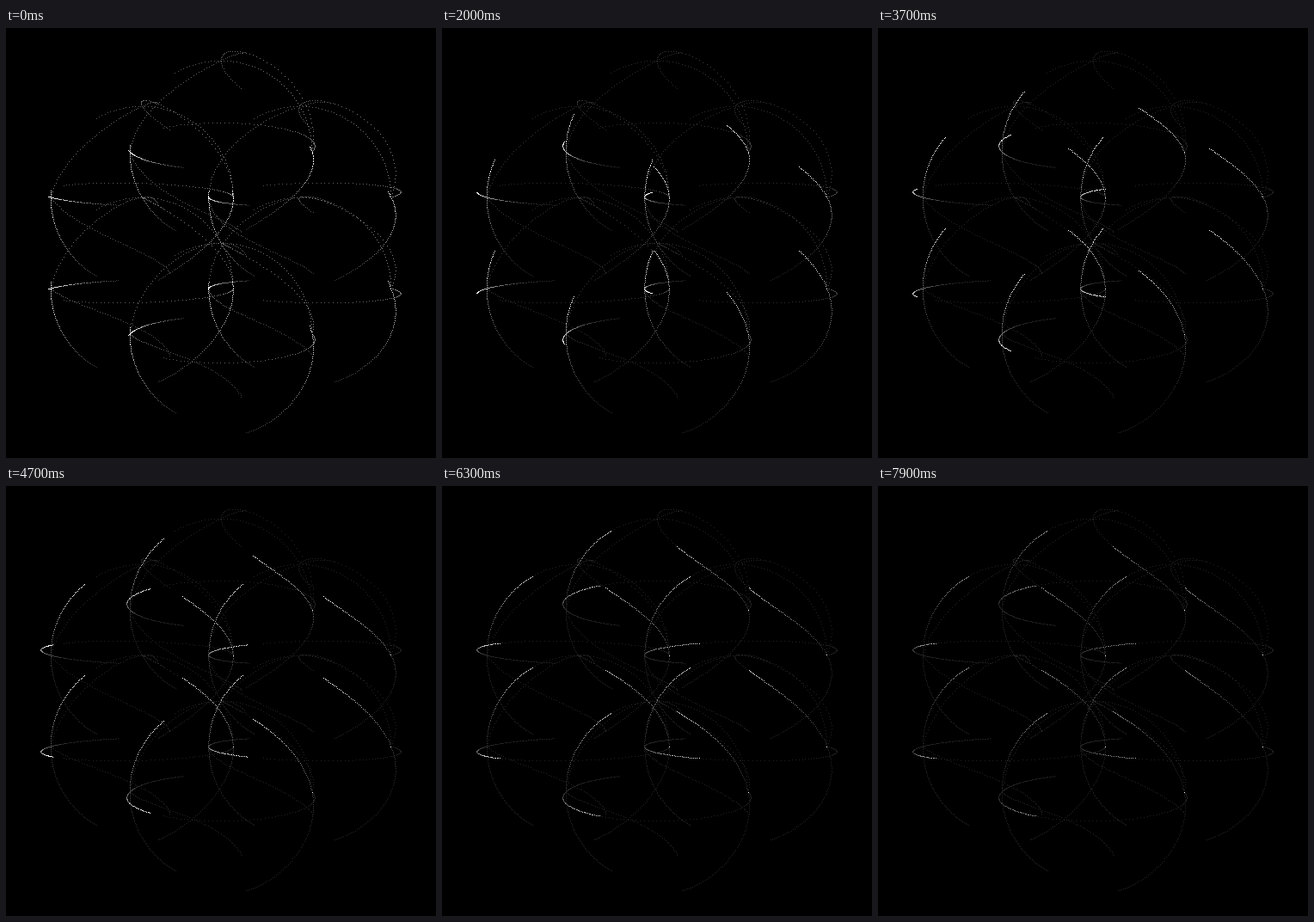
Write an HTML page with a canvas that moves like this. It is 500x500 px and loops after 8 s.

```html
<!DOCTYPE html>
<html lang="en">
<head>
<meta charset="utf-8">
<title>Orbit trails</title>
<style>
  html, body { margin: 0; width: 100%; height: 100%; overflow: hidden; background: #000; }
  canvas { display: block; width: 500px; height: 500px; }
</style>
</head>
<body>
<canvas id="stage" width="500" height="500"></canvas>
<script>
const ctx = document.getElementById("stage").getContext("2d");
const LOOP = 8000, STEP = 100;
const MID = 250, RADIUS = 106, DEPTH = 440;
const FADE = 4.6;   // seconds for a dot to fall to 1/e
const FLOOR = 34;   // grey at which fading stops
const START = 184, STOP = 240;
const RAD = Math.PI / 180;

const anchors = Array.from({ length: 6 }, (_, i) => {
  const a = (i * 60 + 30) * RAD;
  return [RADIUS * Math.cos(a), RADIUS * Math.sin(a)];
});

// A unit vector along x, turned about z by a and then about y by b.
function turn(a, b) {
  a *= RAD;
  b *= RAD;
  return [Math.cos(a) * Math.cos(b), Math.sin(a), Math.cos(a) * Math.sin(b)];
}

const movers = [
  p => turn(p, 0),
  p => turn(0, p),
  p => turn(p, p)
];

// Finished sweeps: path, angles, step, and age in seconds at both ends.
const oldSweeps = [
  ...movers.map(path => ({ path, from: 240, to: 360, by: 2, ages: [5, 3.4] })),
  { path: p => turn(p, p / 2), from: 240, to: 360, by: 2, ages: [5.2, 4] },
  { path: p => turn(p, p * 2), from: 120, to: 180, by: 1, ages: [6.2, 4] }
];

// One crisp pixel beside each anchor.
function dot([x, y, z], grey) {
  const scale = DEPTH / (DEPTH + z * RADIUS);
  ctx.fillStyle = `rgb(${grey},${grey},${grey})`;
  for (const [ax, ay] of anchors) {
    const px = MID + (ax + x * RADIUS) * scale;
    const py = MID + (ay + y * RADIUS) * scale;
    ctx.fillRect(Math.floor(px), Math.floor(py), 1, 1);
  }
}

const greyAt = age => Math.round(Math.max(FLOOR, 255 * Math.exp(-((age / FADE) ** 1.5))));

function draw(step) {
  const now = step * STEP / 1000;
  ctx.globalCompositeOperation = "source-over";
  ctx.fillStyle = "#000";
  ctx.fillRect(0, 0, 500, 500);
  ctx.globalCompositeOperation = "lighten";

  for (const { path, from, to, by, ages } of oldSweeps) {
    for (let p = from; p <= to; p += by) {
      const k = (p - from) / (to - from);
      dot(path(p), greyAt(now + ages[0] + (ages[1] - ages[0]) * k));
    }
  }

  const head = Math.min(STOP, START + step);
  for (const path of movers) {
    for (let p = 120; p <= head; p++) {
      dot(path(p), greyAt((START + step - p) / 10));
    }
  }
  dot(turn(0, 0), 255);
}

let shown = -1;
function tick() {
  const step = Math.floor((performance.now() % LOOP) / STEP);
  if (step !== shown) draw(shown = step);
  requestAnimationFrame(tick);
}
tick();
</script>
</body>
</html>
```
